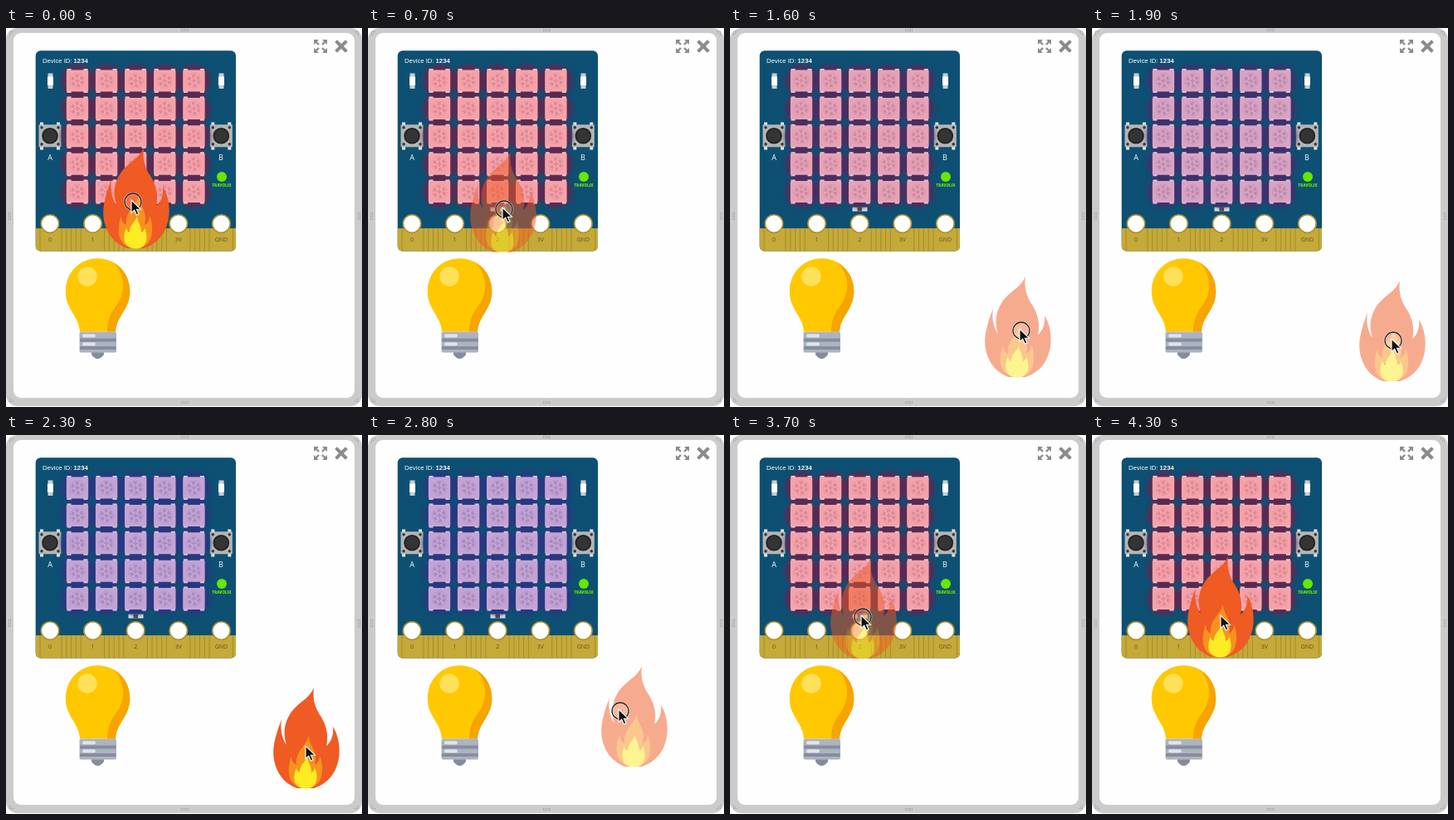
An HTML page for the animation above (4.8 s loop, 429x456 px).

```html
<!DOCTYPE html>
<html lang="en">
<head>
<meta charset="utf-8">
<title>Flame and LED board</title>
<style>
  html, body { margin: 0; width: 100%; height: 100%; overflow: hidden; background: #fff; }
  svg { display: block; width: 429px; height: 456px; }
  text { font-family: "Open Sans", "Noto Sans", sans-serif; }
  .device { font-family: "Liberation Sans", Arial, sans-serif; }
</style>
</head>
<body>
<svg viewBox="0 0 429 456" xmlns="http://www.w3.org/2000/svg">
  <defs>
    <filter id="blur" x="-20%" y="-20%" width="140%" height="140%"><feGaussianBlur stdDeviation="2.600"/></filter>
    <clipPath id="boardClip"><rect x="35.700" y="27.300" width="241.300" height="241.200" rx="6"/></clipPath>
    <path id="bulbShape" d="M110.500 277.300C132 277.300 149.300 294 149.300 317C149.300 339 133 346 132 365.500H89C88 346 71.800 339 71.800 317C71.800 294 89 277.300 110.500 277.300Z"/>
    <clipPath id="bulbClip"><use href="#bulbShape"/></clipPath>
    <g id="led">
      <rect x="-13.200" y="-13" width="26.400" height="26" rx="1.500"/>
      <path d="M-12.500-14.500h5v29h-5zM7.500-14.500h5v29h-5z"/>
      <path d="M-12.500-14.500h5v2h-5zM7.500-14.500h5v2h-5zM-12.500 12.500h5v2h-5zM7.500 12.500h5v2h-5z" fill="#fff" opacity=".3"/>
    </g>
    <g id="ledFace" fill="none">
      <circle r="9" stroke-width="1" stroke-opacity=".5"/>
      <circle r="6" stroke-width="3.400" stroke-dasharray="3.900 2.400"/>
      <path d="M-3 0H3M0-3V3" stroke-width="1.600"/>
    </g>
    <g id="button">
      <path d="M-12-16.300h4v33h-4zM8-16.300h4v33h-4z" fill="#e2e2e2"/>
      <rect x="-13.500" y="-13.500" width="27" height="27" rx="1" fill="#b5b5b5"/>
      <path d="M-10-10h.01M10-10h.01M-10 10h.01M10 10h.01" stroke="#333" stroke-width="3.400" stroke-linecap="round"/>
      <circle r="9.800" fill="#222"/><circle r="8" fill="#343434"/>
    </g>
    <g id="lamp">
      <rect x="-3" y="-9.500" width="6" height="18.500" fill="#c9cdd0"/>
      <rect x="-3.500" y="-5.500" width="7" height="10.500" fill="#fff"/>
    </g>
  </defs>

  <rect width="429" height="455" rx="14" fill="#cbcbcb"/>
  <rect x="9" y="6" width="411" height="439" rx="9" fill="#fefefe"/>
  <g id="grips" fill="#969696"></g>
  <g stroke="#8b8b8b" fill="#8b8b8b">
    <path d="M373 16l4 4M385 16l-4 4M373 28l4-4M385 28l-4-4" stroke-width="2.400"/>
    <path d="M371 14h6l-6 6zM387 14h-6l6 6zM371 30h6l-6-6zM387 30h-6l6-6z" stroke="none"/>
    <path d="M399 17l10 10M409 17l-10 10" stroke-width="4" stroke-linecap="square"/>
  </g>

  <g clip-path="url(#boardClip)">
    <rect x="35" y="27" width="243" height="242" fill="#0d5073"/>
    <rect x="35" y="241" width="243" height="28" fill="#c5a939"/>
    <g id="pads"></g>
  </g>
  <text class="device" x="44" y="41.700" font-size="7.700" fill="#fff">Device ID: <tspan font-weight="700">1234</tspan></text>
  <use href="#lamp" x="53.500" y="64"/><use href="#lamp" x="259.500" y="64"/>
  <use href="#button" x="53" y="129.800"/><use href="#button" x="259.300" y="129.800"/>
  <g font-size="9" fill="#fff" text-anchor="middle"><text x="53" y="159">A</text><text x="259" y="159">B</text></g>
  <circle cx="260" cy="179" r="6" fill="#66e800"/>
  <text x="260" y="190.700" font-size="4.600" font-weight="800" fill="#66e800" text-anchor="middle">TRAVOLIX</text>
  <rect x="147.500" y="215.500" width="18" height="5" fill="#e2e2e2"/>
  <rect x="153.500" y="215.500" width="5.500" height="5" fill="#5a4a48"/>
  <g id="glow" filter="url(#blur)"></g>
  <g id="leds"></g>
  <g id="faces"></g>

  <use href="#bulbShape" fill="#ffc800"/>
  <path clip-path="url(#bulbClip)" fill="#f6a400" d="M122 276C144 290 146 317 133 334C125 345 122 352 122 367H155V276Z"/>
  <circle cx="98" cy="299" r="11.800" fill="#ffe059"/>
  <path d="M103 389h15v4q-7.500 10-15 0z" fill="#858c9b"/>
  <rect x="88.500" y="365.500" width="44.500" height="25" rx="2" fill="#adb3c0"/>
  <path d="M89 375.500h43.500M89 385h43.500" stroke="#868d9d" stroke-width="4"/>
  <path d="M94 370.200h12M94 380.300h12" stroke="#e1e4e9" stroke-width="4" stroke-linecap="round"/>

  <g id="flame">
    <path fill="#f05a23" d="M10-121C8-106 12-96 18-87C25-76 28-64 25-51C31-56 34-64 33-74C41-62 43-42 38-28C33-12 22-4 10 0H-10C-22-4-34-14-38-34C-41-50-35-66-29-83C-31-70-28-59-23-52C-28-68-25-80-17-92C-8-104 4-107 10-121Z"/>
    <path fill="#f7921e" d="M4-64C3-54 12-48 12-36C12-33 11-30 11-28Q17-31 17-39C22-28 21-12 15-6Q9 0 0 0Q-10 0-16-7C-22-15-21-28-17-39Q-17-31-11-28C-13-45 1-50 4-64Z"/>
    <path fill="#fcec24" d="M2-39C2-32 7-28 7-19Q11-21 11-25C15-16 14-7 10-3Q6 .5 0 .5Q-7 0-11-4C-15-9-14-18-11-25Q-11-21-7-19C-8-28 1-32 2-39Z"/>
  </g>
  <g id="cursor">
    <g id="ring" fill="none">
      <circle cx="2" cy="2" r="10" fill="#fff" fill-opacity=".15" stroke="#fff" stroke-opacity=".6" stroke-width="2.600"/>
      <circle cx="2" cy="2" r="10" stroke="#222" stroke-width="1.300"/>
    </g>
    <path d="M0 0V15.500L3.700 12.200L6.300 18L9 16.800L6.500 11.200H11.500Z" fill="#111" stroke="#fff" stroke-width="1.100"/>
  </g>
</svg>
<script>
const $ = id => document.getElementById(id);
const LOOP = 4800, STEP = 100;

// time, flame x, flame y, pointer x, pointer y
const PATH = [
  [500, 156, 265, 151, 207], [700, 162, 270, 162, 216], [800, 175, 281, 183, 234],
  [900, 201, 303, 216, 261], [1000, 236, 330, 252, 290], [1100, 271, 356, 283, 317],
  [1300, 314, 394, 325, 347], [1600, 346, 420, 349, 362], [1900, 361, 425, 361, 374],
  [2500, 361, 425, 361, 374], [2600, 358, 423, 355, 370], [2700, 348, 417, 335, 355],
  [2800, 320, 399, 302, 330], [3000, 267, 349, 245, 278], [3200, 215, 304, 192, 237],
  [3400, 180, 281, 170, 223], [3700, 160, 269, 158, 217], [4000, 154, 267, 155, 217]
];
// time, share of blue in the LEDs
const BLUE = [[1100, 0], [1600, .3], [2300, 1], [2800, 1], [3200, .6], [3700, .05], [4000, 0]];

function sample(keys, t) {
  const next = keys.findIndex(k => k[0] > t);
  if (next === 0) return keys[0].slice(1);
  if (next < 0) return keys[keys.length - 1].slice(1);
  const a = keys[next - 1], b = keys[next], u = (t - a[0]) / (b[0] - a[0]);
  return a.slice(1).map((v, i) => v + (b[i + 1] - v) * u);
}

const mix = (a, b, u) => `rgb(${a.map((v, i) => Math.round(v + (b[i] - v) * u))})`;
const within = (t, from, to) => t >= from && t < to;

function buildGrips() {
  let dots = '';
  const dot = (x, y) => dots += `<rect x="${x}" y="${y}" width="1" height="1"/>`;
  for (let i = 0; i < 5; i++) {
    for (let j = 0; j < 2; j++) {
      dot(211 + i * 2, 1 + j * 2);
      dot(211 + i * 2, 449 + j * 2);
      dot(3 + j * 2, 222 + i * 2);
      dot(424 + j * 2, 222 + i * 2);
    }
  }
  for (let i = 0; i < 3; i++) {
    for (let j = 0; j < 3 - i; j++) {
      const x = 4 + i * 2, y = 4 + j * 2;
      dot(x, y); dot(428 - x, y); dot(x, 453 - y); dot(428 - x, 453 - y);
    }
  }
  $('grips').innerHTML = dots;
}

function buildPads() {
  $('pads').innerHTML = ['0', '1', '2', '3V', 'GND'].map((label, i) => {
    const x = 53 + i * 51.6;
    let lines = '';
    for (let d = 14; d < 40; d += 5.8) lines += `M${x + d} 241v28`;
    if (i === 0) lines += 'M41 241v28';
    return `<path d="${lines}" stroke="#a28a2c" stroke-width=".9"/>
      <circle cx="${x}" cy="235.500" r="10.700" fill="#fff" stroke="#b0922f" stroke-width="1.600"/>
      <text x="${x}" y="256.500" font-size="7" fill="#66561f" text-anchor="middle">${label}</text>`;
  }).join('');
}

function buildLeds() {
  let glow = '', leds = '', faces = '';
  for (let i = 0; i < 25; i++) {
    const x = 86 + i % 5 * 35.1, y = 63.5 + Math.floor(i / 5) * 33.4;
    glow += `<circle cx="${x}" cy="${y}" r="19.500"/>`;
    leds += `<use href="#led" x="${x}" y="${y}"/>`;
    faces += `<use href="#ledFace" x="${x}" y="${y}"/>`;
  }
  $('glow').innerHTML = glow;
  $('leds').innerHTML = leds;
  $('faces').innerHTML = faces;
}

function render(time) {
  const t = Math.floor(time % LOOP / STEP) * STEP;
  const [fx, fy, cx, cy] = sample(PATH, t);
  const [blue] = sample(BLUE, t);
  const dragging = within(t, 600, 2000) || within(t, 2600, 4000);
  const pressed = t < 2000 || within(t, 2500, 4100);

  $('flame').setAttribute('transform', `translate(${fx} ${fy})`);
  $('flame').setAttribute('opacity', dragging ? .5 : 1);
  $('cursor').setAttribute('transform', `translate(${cx} ${cy})`);
  $('ring').setAttribute('visibility', pressed ? 'visible' : 'hidden');
  $('glow').setAttribute('fill', mix([88, 43, 83], [38, 57, 128], blue));
  $('leds').setAttribute('fill', mix([245, 163, 170], [196, 164, 213], blue));
  $('faces').setAttribute('stroke', mix([224, 137, 149], [168, 139, 190], blue));
}

buildGrips();
buildPads();
buildLeds();
const start = performance.now();
function tick() {
  render(performance.now() - start);
  requestAnimationFrame(tick);
}
tick();
</script>
</body>
</html>
```
